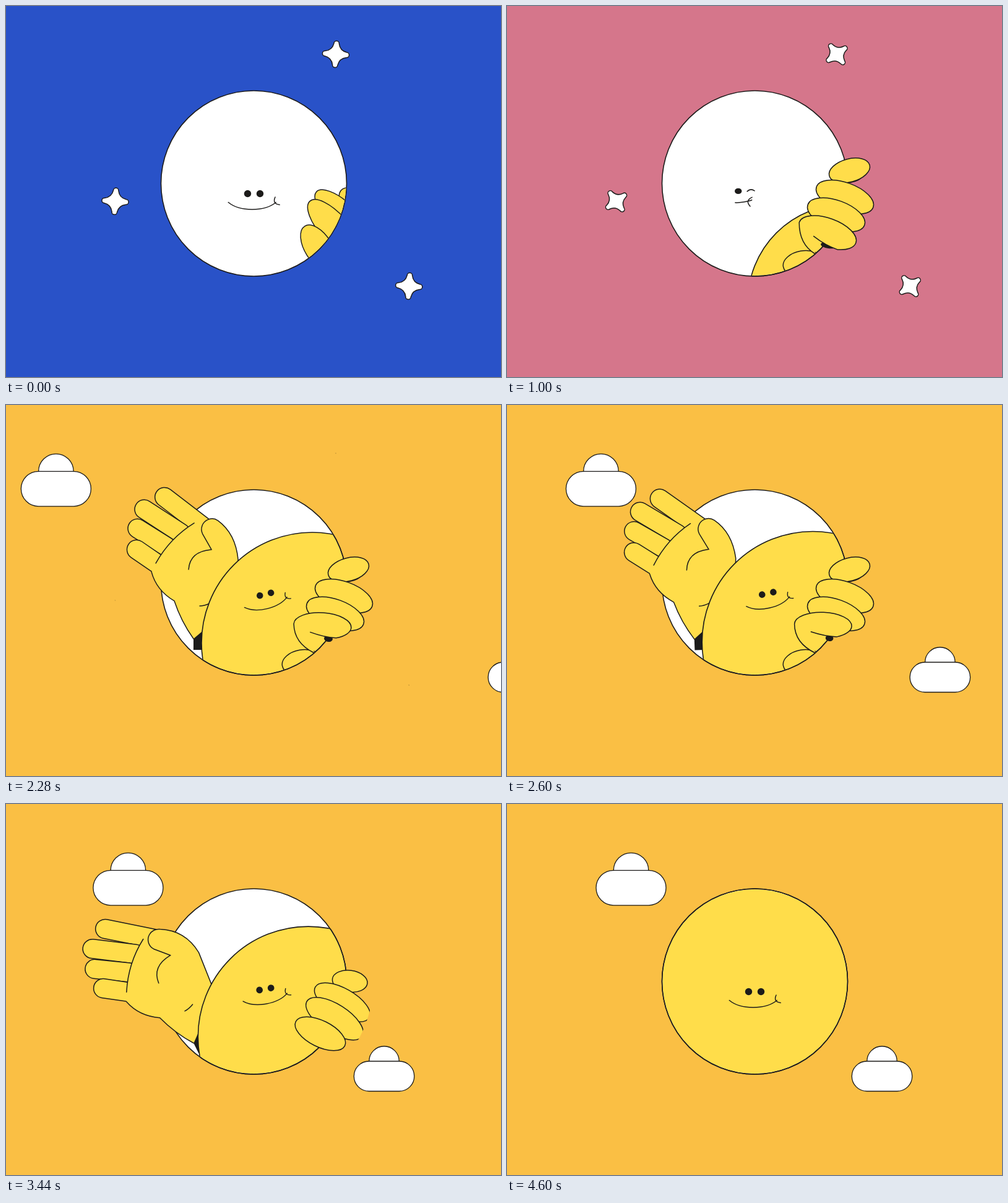
These frames come from a looping animation (800 by 600 pixels, 4640 ms). An HTML page with a canvas:

```html
<!DOCTYPE html>
<html lang="en">
<head>
<meta charset="utf-8">
<title>Moon to sun</title>
<style>
  html, body { margin: 0; width: 100%; height: 100%; overflow: hidden; background: #2952c8; }
  canvas { display: block; width: 800px; height: 600px; }
</style>
</head>
<body>
<canvas id="stage" width="800" height="600"></canvas>
<script>
const ctx = document.getElementById('stage').getContext('2d');
const LOOP = 4640, TAU = Math.PI * 2, DEG = Math.PI / 180;
const INK = '#1c1b1a', YELLOW = '#ffdd4a', WHITE = '#fff';
const BLUE = [41, 82, 200], PINK = [251, 126, 126], ORANGE = [250, 191, 68];
const MOON = { x: 400.5, y: 287, r: 150 };

const clamp = v => Math.min(1, Math.max(0, v));
const ease = (t, a, b) => { const u = clamp((t - a) / (b - a)); return u * u * (3 - 2 * u); };
const mix = (a, b, k) => a.map((v, i) => v + (b[i] - v) * k);

// Smooth monotone interpolation of rows [time, ...values].
function track(keys, t) {
  const last = keys.length - 1;
  if (t <= keys[0][0]) return keys[0].slice(1);
  if (t >= keys[last][0]) return keys[last].slice(1);
  const i = keys.findIndex(k => k[0] > t) - 1;
  const slope = (n, c) => (keys[n + 1][c] - keys[n][c]) / (keys[n + 1][0] - keys[n][0]);
  const tangent = (n, c) => {
    if (n === 0 || n === last) return 0;
    const a = slope(n - 1, c), b = slope(n, c);
    return a * b <= 0 ? 0 : 2 * a * b / (a + b);
  };
  const span = keys[i + 1][0] - keys[i][0], u = (t - keys[i][0]) / span;
  const s = u * u * (3 - 2 * u);
  return keys[i].slice(1).map((v, n) => {
    const c = n + 1;
    return v * (1 - s) + keys[i + 1][c] * s
      + span * u * (1 - u) * ((1 - u) * tangent(i, c) - u * tangent(i + 1, c));
  });
}

function paint(fill, width = 1.5) {
  if (fill) { ctx.fillStyle = fill; ctx.fill(); }
  if (width) { ctx.lineWidth = width; ctx.strokeStyle = INK; ctx.stroke(); }
}
function group(draw) { ctx.save(); draw(); ctx.restore(); }
function place(x, y, deg, draw) {
  group(() => { ctx.translate(x, y); ctx.rotate(deg * DEG); draw(); });
}
function disc(x, y, r) { ctx.beginPath(); ctx.arc(x, y, r, 0, TAU); }
function clipDisc(x, y, r) { disc(x, y, r); ctx.clip(); }
function clipMoon(grow = 0) { clipDisc(MOON.x, MOON.y, MOON.r - 0.8 + grow); }
function oval(x, y, a, b, deg) {
  ctx.beginPath();
  ctx.ellipse(x, y, a, b, deg * DEG, 0, TAU);
}
function bend(x1, y1, cx, cy, x2, y2) {
  ctx.beginPath();
  ctx.moveTo(x1, y1);
  ctx.quadraticCurveTo(cx, cy, x2, y2);
  paint();
}

function star(x, y, t) {
  const size = 1 - ease(t, 760, 2284), tip = 17.4 * size, r = 4.2 * size, dip = 6.2 * size;
  if (size <= 0) return;
  place(x, y, 4 + 122 * ease(t, 0, 2280), () => {
    ctx.beginPath();
    for (let i = 0; i < 4; i++) {
      ctx.arc(0, -tip, r, Math.PI, 0);
      ctx.quadraticCurveTo(dip, -dip, tip, -r);
      ctx.rotate(Math.PI / 2);
    }
    ctx.closePath();
    paint(WHITE);
  });
}

// Glides in, passes its rest place and settles like a spring.
function drift(t, rest, a, b) {
  const u = rest - t;
  return u > 0 ? a * u * u + b * u
    : -b * 300 / Math.PI * Math.exp(u * 0.0011) * Math.sin(-u / 300 * Math.PI);
}
function cloud(x, y, w, h) {
  disc(x, y, h / 2);
  paint(WHITE, 1.3);
  ctx.beginPath();
  ctx.roundRect(x - w / 2, y, w, h, h / 2);
  paint(WHITE, 1.3);
}

// Mouth x, y, half width, sag, turn; cheek x, y, size, turn; eyes x, y, half gap.
const HAPPY = [397.8, 317.5, 38.5, 11.5, 0, 435.5, 317, 0.9, -30, 400.5, 303.5, 10];
const SLEEPY = [387, 317.5, 12.5, 3.2, 0, 400, 317.5, 1.05, 0, 390.5, 301.3, 10.3];
const ANNOYED = [359, 308, 19, -9, -55, 346, 308, 0.35, 70, 351.5, 290, 9.6];

function eye(x, y, open, tilt) {
  place(x, y, tilt, () => {
    if (open > 0.2) {
      oval(0, 0, 5.7, 5.7 * open, 0);
      paint(INK, 0);
    } else {
      const lid = tilt ? -5 : 5;
      bend(-6, 0, 0, lid, 6, 0);
    }
  });
}
function mouth([x, y, w, sag, turn, cx, cy, size, roll]) {
  place(x, y, turn, () => {
    ctx.beginPath();
    ctx.moveTo(-w, 0);
    ctx.bezierCurveTo(-w * 0.52, sag * 1.33, w * 0.52, sag * 1.33, w, 0);
    paint();
  });
  place(cx, cy, roll, () => bend(4 * size, -8 * size, -7 * size, 0, 4 * size, 8 * size));
}

function moonFace(t) {
  const grumpy = ease(t, 860, 1400), shut = ease(t, 540, 680);
  const pose = mix(mix(HAPPY, SLEEPY, ease(t, 440, 740)), ANNOYED, grumpy);
  const [x, y, gap] = pose.slice(9);
  eye(x - gap, y, 1 - shut + ease(t, 900, 1040), 0);
  eye(x + gap, y, 1 - shut, -26 * grumpy);
  mouth(pose);
}

// Time, x, y, radius.
const SUN = [
  [480, 620, 520, 152], [760, 555, 492, 155], [1520, 535.7, 453.1, 165], [2280, 495, 385, 179],
  [3360, 493, 381, 179], [3880, 416, 303, 168], [4160, 400.5, 287, 168]
];
// Time, x, y, turn, size.
const SUN_FACE = [
  [900, 520, 470, -65, 0.94], [1520, 454, 382.5, -52.5, 0.94], [2280, 419.2, 306, -13.7, 0.92],
  [3000, 424.2, 304, -12, 0.94], [3360, 424.2, 304, -12, 0.94], [3850, 352, 238, 12, 0.95],
  [4400, 400.5, 303.5, 0, 1]
];

function sun(t) {
  const [x, y, r] = track(SUN, t);
  const [fx, fy, turn, size] = track(SUN_FACE, t);
  const grin = 0.1 + 0.9 * ease(t, 1520, 2100);
  group(() => {
    clipMoon();
    disc(x, y, r);
    paint(YELLOW, 1.6);
    place(fx, fy, turn, () => {
      ctx.scale(size, size);
      eye(-10, 0, 1, 0);
      eye(10, 0, 1, 0);
      ctx.translate(0, 20 * (1 - grin));
      ctx.scale(grin, grin);
      ctx.translate(-HAPPY[9], -HAPPY[10]);
      mouth(HAPPY);
    });
  });
  // The rim stays visible over anything behind the sun.
  group(() => {
    clipDisc(x, y, r);
    disc(MOON.x, MOON.y, MOON.r);
    paint(null, 1.6);
  });
}

// A round-ended finger from its knuckle.
function stick(x, y, length, deg) {
  ctx.beginPath();
  ctx.moveTo(x, y);
  ctx.lineTo(x - length * Math.cos(deg * DEG), y - length * Math.sin(deg * DEG));
  for (const [color, width] of [[INK, 32.5], [YELLOW, 29.5]]) {
    ctx.strokeStyle = color;
    ctx.lineWidth = width;
    ctx.stroke();
  }
}

function palm(fold) {
  ctx.fillStyle = INK;
  ctx.fillRect(303, 366, 50, 30);
  stick(325, 202, 87, 37.5);
  stick(282, 207, 70, 33);
  stick(259, 229, 55, 32);
  stick(243, 256, 39, 34.5);

  const heel = () => {
    ctx.moveTo(235, 270);
    ctx.quadraticCurveTo(243, 300, 272, 317);
    ctx.quadraticCurveTo(283, 350, 303, 378);
  };
  ctx.beginPath();
  heel();
  ctx.lineTo(360, 330);
  ctx.lineTo(375, 250);
  ctx.lineTo(325, 193);
  ctx.lineTo(304, 191);
  ctx.quadraticCurveTo(265, 215, 242, 256);
  paint(YELLOW, 0);
  ctx.beginPath();
  heel();
  paint();

  // Thumb: its tip curls in as the hand swings.
  ctx.beginPath();
  ctx.moveTo(332, 234);
  ctx.arc(333 - 16 * fold, 201 + 4 * fold, 17, (155 - 25 * fold) * DEG, 305 * DEG);
  ctx.quadraticCurveTo(371, 208, 375, 250);
  ctx.lineTo(368, 340);
  paint(YELLOW);
  bend(242, 256, 265, 215, 304, 191);
  bend(295, 266, 297, 237, 331, 234);
  bend(313, 325, 320, 325, 329, 321);
}

function wavingHand(t) {
  if (t < 1700 || t > 3760) return;
  const swing = Math.sin((t - 2280) / 560 * TAU) * ease(t, 1900, 2280);
  const slide = 225 * (1 - ease(t, 1720, 2200) + ease(t, 3420, 3740));
  const drop = ease(t, 3220, 3480), curl = Math.max(0, swing);
  group(() => {
    // Free on the upper left, elsewhere only seen through the disc.
    ctx.beginPath();
    ctx.moveTo(0, 0);
    ctx.lineTo(690, 0);
    ctx.lineTo(0, 690);
    ctx.closePath();
    ctx.moveTo(MOON.x + MOON.r, MOON.y);
    ctx.arc(MOON.x, MOON.y, MOON.r, 0, TAU);
    ctx.clip();
    place(318 + slide - 2 * curl, 385 + slide - 3 * curl, 5 * swing * (1 - drop) - 28 * drop, () => {
      ctx.translate(-318, -385);
      palm(curl);
    });
  });
}

// A straight finger lying across the rim: x, y, half length, half width, turn.
function peek(rim, length, width, away) {
  const r = MOON.r - 2 + away;
  return [MOON.x + r * Math.cos(rim * DEG), MOON.y + r * Math.sin(rim * DEG), length, width, 30 + rim * 0.62];
}
const curled = n => [546 - 14 * n, 309 + 28.8 * n, 48.7, 23.3, 20];
const LIFTED = [511.5, 357, 46.5, 21, 4];

function littleFinger([x, y, a, b, deg]) {
  ctx.beginPath();
  ctx.moveTo(498, 401);
  ctx.quadraticCurveTo(x - 46, 385, x - a * Math.cos(deg * DEG), y - a * Math.sin(deg * DEG));
  ctx.ellipse(x, y, a, b, deg * DEG, Math.PI, TAU + 60 * DEG);
  ctx.translate(x, y);
  ctx.rotate(deg * DEG);
  ctx.quadraticCurveTo(4, b * 0.88, -19, b * 0.56);
  paint(YELLOW);
}

function grippingHand(t) {
  if (t > 3800) return;
  const grip = ease(t, 120, 540) - ease(t, 3320, 3580);
  const lift = ease(t, 1640, 2240) + 0.2 * ease(t, 2280, 2900);
  const away = 100 * ease(t, 3560, 3800);
  const hide = 55 * (1 - ease(t, 460, 700) + ease(t, 3320, 3600));
  group(() => {
    clipMoon();
    oval(478 + hide, 416 + hide, 32, 20, -10);
    paint(YELLOW);
  });
  group(() => {
    clipMoon(80 * grip);
    const finger = pose => { oval(...pose); paint(YELLOW); };
    if (grip > 0.9) {
      oval(555, 280, 18, 6, -10);
      paint(INK, 0);
      oval(520 + lift, 387 - 9 * lift, 13 - 6 * lift, 5, 8);
      paint(INK, 0);
    }
    finger(mix(peek(9, 22, 16, 12 + away), [553.5, 266, 33.8, 18.7, -15], grip));
    finger(mix(peek(19, 52, 21, away), curled(0), grip));
    finger(mix(peek(29, 58, 23, away), curled(1), grip));
    const little = mix(peek(45, 42, 22, away), mix(curled(2), LIFTED, lift), grip);
    if (grip > 0.7) littleFinger(little);
    else finger(little);
  });
}

function draw(t) {
  const sky = mix(mix(BLUE, PINK, ease(t, 600, 1150)), ORANGE, ease(t, 1700, 2270));
  ctx.fillStyle = `rgb(${sky.map(Math.round)})`;
  ctx.fillRect(0, 0, 800, 600);
  ctx.lineCap = ctx.lineJoin = 'round';

  star(533, 78, t);
  star(176.5, 315.8, t);
  star(651.3, 453, t);
  cloud(201.5 - drift(t, 3000, 0.000136, 0.07), 107.3, 113, 56.5);
  cloud(604.8 + drift(t, 3035, 0.00024, 0.115), 416, 97.5, 48.5);

  disc(MOON.x, MOON.y, MOON.r);
  paint(WHITE, 1.6);
  moonFace(t);
  wavingHand(t);
  sun(t);
  grippingHand(t);
}

function tick() {
  draw(performance.now() % LOOP);
  requestAnimationFrame(tick);
}
tick();
</script>
</body>
</html>
```
